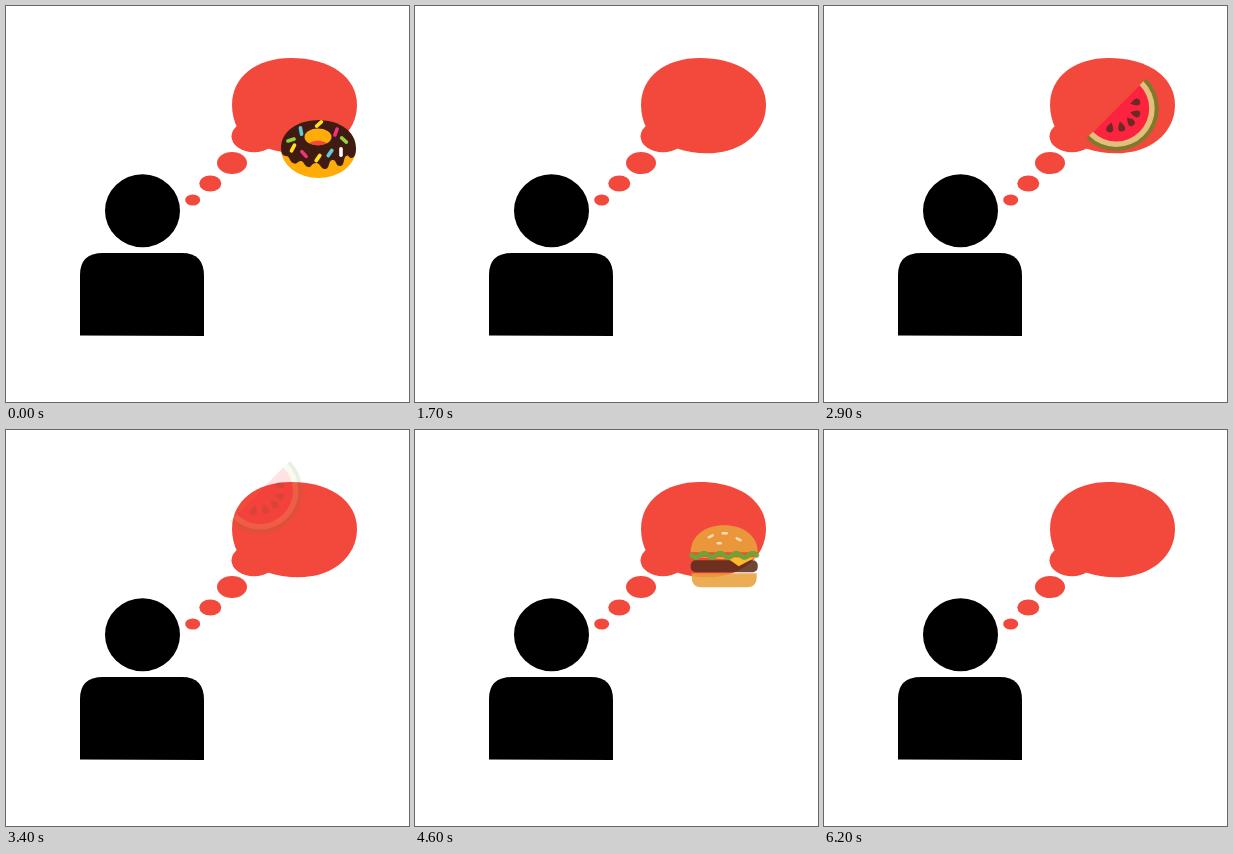
Write an HTML page that moves like this. It is 403 by 396 pixels and loops after 6.3 s.

```html
<!DOCTYPE html>
<html lang="en">
<head>
<meta charset="utf-8">
<title>Thinking of food</title>
<style>
html, body { margin: 0; width: 100%; height: 100%; overflow: hidden; background: #fff; }
svg { display: block; width: 100vw; height: 100vh; }
</style>
</head>
<body>
<svg viewBox="0 0 403 396" xmlns="http://www.w3.org/2000/svg">
  <ellipse cx="136.5" cy="204.7" rx="37.5" ry="36.5"/>
  <path d="M74 329.5V269Q74 247 97 247H176Q198 247 198 270V330Z"/>
  <g fill="#f2493c">
    <path d="M285 52C324 52 351 71 351 99C351 127 326 147.300 292 147.300C281 147.300 271 145.500 262 142.500L231 121C228 115 226 107 226 99C226 71 250 52 285 52Z"/>
    <ellipse cx="248" cy="130.300" rx="22.500" ry="16"/>
    <ellipse cx="226" cy="157" rx="15" ry="11"/>
    <ellipse cx="204.300" cy="177.500" rx="11" ry="8"/>
    <ellipse cx="186.700" cy="194" rx="7.500" ry="5.600"/>
  </g>
  <g id="foods"></g>
</svg>
<script>
const STEP = 100, SLOT = 9, LAST = 7;

const path = (d, fill, extra = '') => `<path d="${d}" fill="${fill}" ${extra}/>`;
const line = (d, color, width) =>
  `<path d="${d}" fill="none" stroke="${color}" stroke-width="${width}" stroke-linecap="round" stroke-linejoin="round"/>`;
const rect = (x, y, w, h, r, fill) =>
  `<rect x="${x}" y="${y}" width="${w}" height="${h}" rx="${r}" fill="${fill}"/>`;

// Sine line along x
function wave(x0, x1, y, amp, turns) {
  const n = turns * 10;
  return 'M' + Array.from({ length: n + 1 }, (_, i) =>
    `${(x0 + (x1 - x0) * i / n).toFixed(1)} ${(y + amp * Math.sin(i / n * turns * 2 * Math.PI)).toFixed(1)}`
  ).join('L');
}

function donut() {
  const hole = 'M28 23Q37 18 46 23Q37 28.500 28 23Z';
  const ring = 'M23.500 17a13.500 8.500 0 1 0 27 0a13.500 8.500 0 1 0 -27 0Z';
  const sprinkles = [
    [38, 4, -42, '#ffe11f'], [20, 11, 80, '#62cbd8'], [10, 20, -18, '#94d13d'],
    [55, 12, 110, '#f0347c'], [63, 20, 42, '#94d13d'], [12, 28, -62, '#ffe11f'],
    [23, 34, 48, '#f0347c'], [37, 38, -55, '#ffe11f'], [49, 33, -55, '#62cbd8'],
    [60, 32, 90, '#fff']
  ];
  return path('M0 29a37.500 29 0 1 0 75 0a37.500 29 0 1 0 -75 0Z' + hole, '#ffac08', 'fill-rule="evenodd"') +
    path('M0 28C0 11 17 0 37.500 0C58 0 75 11 75 28C75 33 74 37 71 38C67 38 68 34 65 36C62 38 64 46 59 46' +
      'C54 46 56 39 51 40C47 41 49 49 44 49C39 49 40 43 35 43C30 43 31 48 27 47C23 46 23 40 19 41' +
      'C16 42 16 45 12 43C8 41 9 36 5 36C1 36 0 32 0 28Z' + ring, '#401b12', 'fill-rule="evenodd"') +
    sprinkles.map(([x, y, a, c]) =>
      `<g transform="translate(${x} ${y}) rotate(${a})">${rect(-5, -1.8, 10, 3.6, 1.8, c)}</g>`).join('');
}

function iceCream() {
  return path('M8 33H43L25.500 74Z', '#e0a04a') +
    line('M14 42L30 60M23 37L36 50M37 42L21 60M28 37L16 50', '#b97830', 1.5) +
    path('M0 30C0 12 10 0 25.500 0C41 0 51 12 51 30C51 39 42 40 39 35C36 42 29 42 26 36C22 42 15 41 12 35C8 40 0 38 0 30Z', '#ffc7d5');
}

function fries() {
  const sticks = [[4, 12], [13, 3], [22, 8], [31, 0], [40, 6], [48, 13]];
  return sticks.map(([x, y], i) => rect(x, y, 7, 42, 1, i % 2 ? '#ffd54f' : '#ffc21a')).join('') +
    path('M0 24Q29 42 58 24L51 63Q50 66 47 66H11Q8 66 7 63Z', '#d8232e');
}

function melon() {
  const half = (r, c) => {
    const k = r * Math.SQRT1_2;
    return path(`M${30 - k} ${30 + k}A${r} ${r} 0 0 0 ${30 + k} ${30 - k}Z`, c);
  };
  const seeds = [[49, 24, 75], [49, 35, 105], [44, 43, 140], [35, 48, 165], [24, 49, 195]];
  return half(42.5, '#598a24') + half(38.5, '#dfe592') + half(33, '#ff173f') +
    seeds.map(([x, y, a]) =>
      path('M0 -5C2 -2 3.500 0 3.500 2A3.500 3 0 0 1 -3.500 2C-3.500 0 -2 -2 0 -5Z', '#3e2020',
        `transform="translate(${x} ${y}) rotate(${a + 180})"`)).join('');
}

function hotDog() {
  const leaf = s => line(wave(-30, 30, s * 12, 4, 5), '#4b9824', 5.5);
  return '<g transform="translate(36 36) rotate(-45)">' +
    rect(-35, -23, 70, 46, 19, '#f5b30f') + leaf(-1) + leaf(1) +
    rect(-47, -7.5, 94, 15, 7.5, '#cf1f25') +
    line(wave(-32, 32, 0, 3.7, 3.5), '#ffe650', 3.6) + '</g>';
}

function burger() {
  return path('M2 27C2 10 17 0 35.500 0C54 0 69 10 69 27Z', '#e9a13b') +
    rect(2, 35, 67, 12, 5, '#5b2d1c') +
    path('M4 32H67L50 41L40 34Z', '#ffc928') +
    line(wave(3, 68, 30, 2, 4), '#65ad35', 5) +
    path('M3 48H68V52Q68 62 58 62H13Q3 62 3 52Z', '#e9a13b') +
    line('M20 12l4 -2M34 8h4M48 13l4 2M29 18h3', '#fff0c4', 2.5);
}

function pizza() {
  const slices = [[25, 25], [48, 28], [36, 48]];
  return path('M4 13L68 13L36 78Z', '#ffc83d') +
    path('M0 12Q36 -12 72 12Q72 19 66 19Q36 5 6 19Q0 19 0 12Z', '#c9792b') +
    slices.map(([x, y]) => `<circle cx="${x}" cy="${y}" r="7" fill="#c92d27"/>`).join('') +
    line('M36 23l5 3M30 37l-3 4M45 42l4 -4', '#4b8b2d', 3);
}

// [drawing, start x, start y, end x, end y]
const foods = [
  [donut, 275, 114, 221.5, 47],
  [iceCream, 289, 98, 236, 31],
  [fries, 284, 103, 231, 36],
  [melon, 277.5, 89, 224, 31],
  [hotDog, 277, 97, 226, 38],
  [burger, 281, 104, 230, 43],
  [pizza, 275, 106, 226, 36]
];

const layer = document.getElementById('foods');
layer.innerHTML = foods.map(([draw]) => `<g>${draw()}</g>`).join('');
const nodes = [...layer.children];
const total = foods.length * SLOT;

function render(ms) {
  const tick = Math.floor(ms / STEP) % total;
  const current = Math.floor(tick / SLOT);
  const i = tick % SLOT;
  nodes.forEach((node, n) => {
    const on = n === current && i <= LAST;
    node.setAttribute('display', on ? 'inline' : 'none');
    if (!on) return;
    const [, x0, y0, x1, y1] = foods[n];
    const p = i / LAST;
    node.setAttribute('transform', `translate(${x0 + (x1 - x0) * p} ${y0 + (y1 - y0) * p})`);
    node.setAttribute('opacity', 1 - i / (LAST + 1));
  });
}

const start = performance.now();
function loop() {
  render(performance.now() - start);
  requestAnimationFrame(loop);
}
loop();
</script>
</body>
</html>
```
